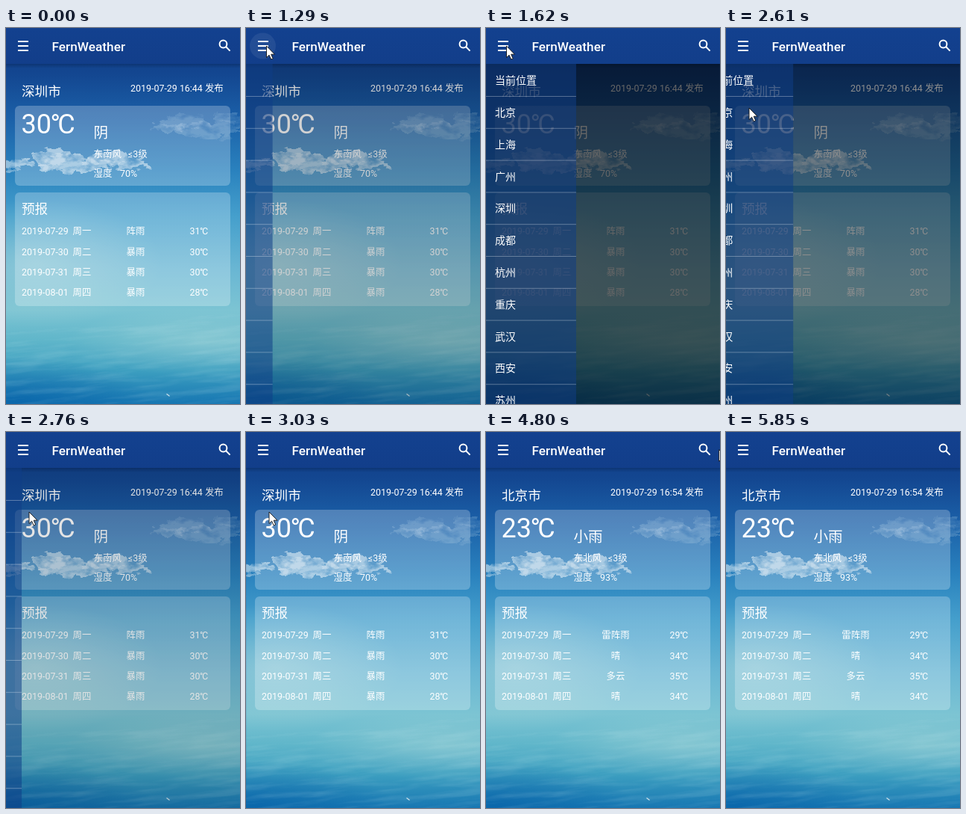
Animation, 314 px wide and 503 px high, one loop 6270 ms. Source, as an HTML page:

```html
<!DOCTYPE html>
<html lang="zh-CN">
<head>
<meta charset="utf-8">
<style>
  html, body { margin: 0; width: 100%; height: 100%; overflow: hidden; background: #123f86; }
  svg { display: block; width: 314px; height: 503px; }
  text { font: 12.45px Roboto, "Noto Sans CJK SC", "Noto Sans CJK", sans-serif; fill: #fff; white-space: pre; }
  #title { font-size: 17.3px; font-weight: 500; }
  .head { font-size: 17.6px; }
  .city { font-weight: 500; }
  .temp { font-size: 36px; }
  .sky { font-size: 19.6px; }
  #drawer text { font-size: 14px; font-weight: 500; }
  .mid { text-anchor: middle; }
</style>
</head>
<body>
<svg viewBox="0 0 314 503">
  <defs>
    <linearGradient id="air" x2="0" y2="1">
      <stop offset="0" stop-color="#113c88"/>
      <stop offset=".12" stop-color="#134690"/>
      <stop offset=".24" stop-color="#1b60a8"/>
      <stop offset=".38" stop-color="#2a82be"/>
      <stop offset=".5" stop-color="#459fcc"/>
      <stop offset=".64" stop-color="#69b6d3"/>
      <stop offset=".75" stop-color="#7cc4d3"/>
      <stop offset=".83" stop-color="#60b6ca"/>
      <stop offset=".91" stop-color="#3d9fc0"/>
      <stop offset="1" stop-color="#1676b2"/>
    </linearGradient>
    <linearGradient id="bar" x2="0" y2="1">
      <stop offset="0" stop-color="#13418f"/>
      <stop offset="1" stop-color="#123e8a"/>
    </linearGradient>
    <linearGradient id="shade" x2="0" y2="1">
      <stop offset="0" stop-color="#04204c" stop-opacity=".4"/>
      <stop offset="1" stop-color="#04204c" stop-opacity="0"/>
    </linearGradient>
    <radialGradient id="deep">
      <stop offset="0" stop-color="#0560a8" stop-opacity=".7"/>
      <stop offset="1" stop-color="#0560a8" stop-opacity="0"/>
    </radialGradient>
    <radialGradient id="glow">
      <stop offset="0" stop-color="#b5dcdc" stop-opacity=".45"/>
      <stop offset="1" stop-color="#b5dcdc" stop-opacity="0"/>
    </radialGradient>
    <filter id="fluff" x="-20%" y="-60%" width="140%" height="220%">
      <feTurbulence type="fractalNoise" baseFrequency=".05 .09" numOctaves="5" seed="8" result="noise"/>
      <feDisplacementMap in="SourceGraphic" in2="noise" scale="24" xChannelSelector="R" yChannelSelector="G" result="shape"/>
      <feColorMatrix in="noise" values="0 0 0 0 1  0 0 0 0 1  0 0 0 0 1  0 0 3 0 -.7"/>
      <feComposite in="shape" operator="in"/>
      <feGaussianBlur stdDeviation=".7"/>
    </filter>
    <filter id="ripples" x="0" y="0" width="1" height="1">
      <feTurbulence type="fractalNoise" baseFrequency=".012 .12" numOctaves="4" seed="4"/>
      <feColorMatrix values="0 0 0 0 .72  0 0 0 0 .9  0 0 0 0 .9  1.4 0 0 0 -.6"/>
    </filter>
  </defs>

  <rect width="314" height="503" fill="url(#air)"/>
  <ellipse cx="40" cy="315" rx="170" ry="85" fill="url(#glow)"/>
  <g filter="url(#fluff)">
    <g fill="#b4d2e6" fill-opacity=".75">
      <ellipse cx="12" cy="182" rx="25" ry="6"/>
      <ellipse cx="62" cy="172" rx="24" ry="13"/>
      <ellipse cx="95" cy="182" rx="50" ry="11"/>
      <ellipse cx="145" cy="175" rx="38" ry="9"/>
      <ellipse cx="172" cy="184" rx="20" ry="5"/>
    </g>
    <g fill="#8db5d7" fill-opacity=".32">
      <ellipse cx="238" cy="126" rx="34" ry="8"/>
      <ellipse cx="270" cy="136" rx="48" ry="10"/>
      <ellipse cx="300" cy="122" rx="22" ry="8"/>
      <ellipse cx="216" cy="133" rx="24" ry="4"/>
    </g>
  </g>
  <ellipse cx="270" cy="420" rx="190" ry="45" fill="url(#glow)"/>
  <ellipse cx="10" cy="500" rx="190" ry="60" fill="url(#deep)"/>
  <rect x="-20" y="395" width="360" height="150" filter="url(#ripples)" opacity=".26" transform="rotate(-5 157 440)"/>
  <path d="M215.5 489.5l4 3" stroke="#cfe3ec" stroke-width="1.2"/>

  <g fill="#fff" fill-opacity=".24">
    <rect x="12" y="104" width="289" height="107" rx="6"/>
    <rect x="12" y="220" width="289" height="152" rx="6"/>
  </g>
  <g id="report"></g>

  <rect y="48" width="314" height="6" fill="url(#shade)"/>
  <rect id="scrim" y="48" width="314" height="455"/>
  <g id="drawer"><rect y="48" width="121" height="455" fill="#0f3d88" fill-opacity=".54"/></g>

  <rect width="314" height="48" fill="url(#bar)"/>
  <circle id="press" cx="22.5" cy="24" r="17.5" fill="#fff"/>
  <path d="M16 18h14M16 24h14M16 30h14" stroke="#fff" stroke-width="2"/>
  <text id="title" x="61.5" y="30.5">FernWeather</text>
  <g fill="none" stroke="#fff" stroke-width="2">
    <circle cx="291.5" cy="21.5" r="4.9"/>
    <path d="M295 25l5.6 5.6"/>
  </g>
  <path id="cursor" d="M0 0V15.5L3.6 12.2L6.2 18L8.7 16.9L6.2 11.2H11Z" fill="#fff" stroke="#111" stroke-width=".9"/>
</svg>
<script>
const LOOP = 6270, STEP = 30, DRAWER_WIDTH = 121;
const $ = id => document.getElementById(id);

const shenzhen = {
  city: '深圳市', time: '16:44', temp: 30, sky: '阴', wind: '东南风', humidity: 70,
  days: [['阵雨', 31], ['暴雨', 30], ['暴雨', 30], ['暴雨', 28]]
};
const beijing = {
  city: '北京市', time: '16:54', temp: 23, sky: '小雨', wind: '东北风', humidity: 93,
  days: [['雷阵雨', 29], ['晴', 34], ['多云', 35], ['晴', 34]]
};
const dates = ['07-29 周一', '07-30 周二', '07-31 周三', '08-01 周四'];
const places = '当前位置 北京 上海 广州 深圳 成都 杭州 重庆 武汉 西安 苏州'.split(' ');

const label = (x, y, text, cls = '') => `<text x="${x}" y="${y}" class="${cls}">${text}</text>`;

function reportMarkup(r) {
  const rows = r.days.map(([sky, temp], i) => {
    const y = 276.3 + i * 27.3, [date, weekday] = dates[i].split(' ');
    return label(21, y, '2019-' + date) + label(89.5, y, weekday) +
      label(174, y, sky, 'mid') + label(259, y, temp + '℃', 'mid');
  });
  return label(21, 90.5, r.city, 'head city') + label(167, 84.7, `2019-07-29 ${r.time} 发布`) +
    label(20.5, 141, r.temp + '℃', 'temp') + label(117.5, 146.5, r.sky, 'sky') +
    label(117.5, 173.3, r.wind) + label(164, 173.3, '≤3级') +
    label(117.5, 199, '湿度') + label(153, 199, r.humidity + '%') +
    label(21, 247.5, '预报', 'head') + rows.join('');
}

$('drawer').innerHTML += places.map((place, i) => {
  const y = 75.2 + i * 42.8;
  return label(12, y, place) +
    `<path d="M0 ${y + 16.3}h121" stroke="#fff" stroke-opacity=".3"/>`;
}).join('');

// Each stretch of pointer travel: [time, x, y] points, hidden outside them.
const trips = [
  [[240, 303, 33], [390, 23, 17], [540, 23, 17], [840, 27.5, 24], [1680, 27.5, 24],
   [1890, 30, 51], [2400, 31, 107], [3510, 31, 107], [3750, 217, 52], [4050, 316, 34]],
  [[4770, 316, 24], [5010, 289.5, 21.5], [5520, 289.5, 21.5], [5850, 316, 60]]
];

const clamp = v => Math.min(1, Math.max(0, v));
const quintOut = v => 1 - (1 - clamp(v)) ** 5;

function pointerAt(t) {
  const trip = trips.find(p => t >= p[0][0] && t < p.at(-1)[0]);
  if (!trip) return null;
  const i = trip.findIndex(p => p[0] > t);
  const [t0, x0, y0] = trip[i - 1], [t1, x1, y1] = trip[i];
  const k = (t - t0) / (t1 - t0);
  return [x0 + (x1 - x0) * k, y0 + (y1 - y0) * k];
}

let shown;
function draw(t) {
  const report = t < 3210 ? shenzhen : beijing;
  if (report !== shown) $('report').innerHTML = reportMarkup(shown = report);

  const open = t < 2574 ? quintOut((t - 1260) / 445) : 1 - quintOut((t - 2574) / 630);
  $('drawer').setAttribute('transform', `translate(${(open - 1) * DRAWER_WIDTH})`);
  $('scrim').setAttribute('opacity', .6 * open);

  const press = clamp((t - 1260) / 60) * clamp((1600 - t) / 180);
  $('press').setAttribute('opacity', .14 * press);

  const at = pointerAt(t);
  $('cursor').setAttribute('visibility', at ? 'visible' : 'hidden');
  if (at) $('cursor').setAttribute('transform', `translate(${at})`);
}

const start = performance.now();
function tick() {
  const t = (performance.now() - start) % LOOP;
  draw(Math.floor(t / STEP) * STEP);
  requestAnimationFrame(tick);
}
tick();
</script>
</body>
</html>
```
